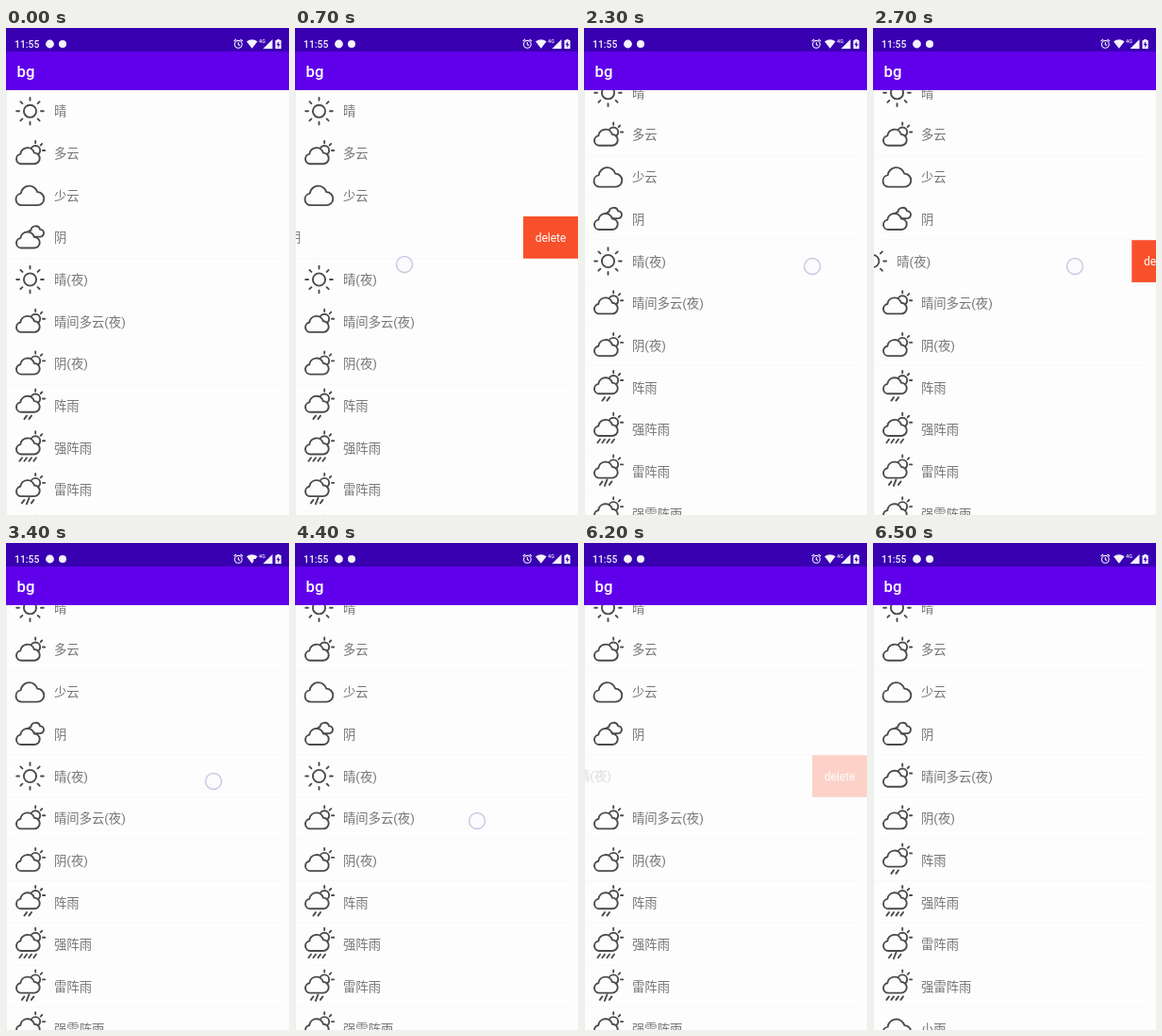
Write an HTML page that moves like this. It is 300 px wide and 517 px high and loops after 7.7 s.

```html
<!DOCTYPE html>
<html lang="zh-CN">
<head>
<meta charset="utf-8">
<title>bg</title>
<style>
  html, body { margin: 0; width: 100%; height: 100%; overflow: hidden; background: #fdfdfd; }
  svg { display: block; width: 100%; height: 100%; }
  text { font-family: Roboto, "Noto Sans CJK SC", "Noto Sans CJK", sans-serif; }
  .label { font-size: 13.33px; fill: #757575; }
  .icon { fill: none; stroke: #4b4b4b; stroke-width: 1.9; stroke-linecap: round; stroke-linejoin: round; }
  .icon * { vector-effect: non-scaling-stroke; }
  .solid { fill: #fdfdfd; }
</style>
</head>
<body>
<svg id="stage" viewBox="0 0 300 517">
  <rect width="300" height="517" fill="#fdfdfd"/>
  <g id="list"></g>
  <rect y="66" width="1" height="451" fill="#ebeeee"/>
  <rect y="25" width="300" height="41" fill="#6000ea"/>
  <rect width="300" height="25" fill="#3800b1"/>
  <text x="11.5" y="51.5" font-size="16.67" font-weight="500" fill="#fff">bg</text>
  <g fill="#f4f2fb">
    <text x="9" y="20.8" font-size="10.4" font-weight="500">11:55</text>
    <circle cx="46.5" cy="17" r="4.4"/>
    <circle cx="60" cy="17" r="4"/>
    <g fill="none" stroke="#f4f2fb" stroke-width="1.1">
      <circle cx="246.3" cy="17.3" r="3.9"/>
      <path d="M246.3 15v2.6l1.8 1M241.6 14l2.4-2M251 14l-2.4-2"/>
    </g>
    <path d="M255 14.3Q260.8 10 266.600 14.3L260.8 21.800Z"/>
    <path id="notch" d="M262.500 21.500v-4.500h4.500v4.500z" fill="#3800b1"/>
    <text x="268" y="15.600" font-size="5.500" font-weight="500">4G</text>
    <path d="M282.500 12v10h-10z"/>
    <path d="M285.500 13h1.700v-1h2.800v1h1.700v9h-6.200z"/>
    <path d="M289.200 14l-2.400 4h1.500v3l2.300-4h-1.400z" fill="#3800b1"/>
  </g>
  <circle id="touch" r="8.500" fill="#fafaff" fill-opacity=".6" stroke="#cbc9e4" stroke-width="1.500"/>
</svg>
<script>
const LOOP = 7700, STEP = 100;
const ROW = 44.68, TOP = 66, MENU = 58;
const SWIPED = 3, DELETED = 4;
const $ = id => document.getElementById(id);

// Icons, drawn around their own centre
const cloudPath = 'M-8.5 10.5a6.3 6.3 0 0 1-1-12.5a9 9 0 0 1 17.6-1.5a7 7 0 0 1 0 14z';
const cloud = (x = 0, y = 0, s = 1) =>
  `<path class="solid" transform="translate(${x} ${y}) scale(${s})" d="${cloudPath}"/>`;

function sunAt(x, y, r, inner, outer, from, to) {
  let rays = '';
  for (let a = from; a <= to; a += 45) {
    const c = Math.cos(a * Math.PI / 180), s = Math.sin(a * Math.PI / 180);
    rays += `M${x + c * inner} ${y + s * inner}L${x + c * outer} ${y + s * outer}`;
  }
  return `<circle cx="${x}" cy="${y}" r="${r}"/><path d="${rays}"/>`;
}

const sun = () => sunAt(0.3, 0, 6.6, 11.5, 14.3, 0, 315);
const partly = () => sunAt(6, -3, 5, 7.8, 10, -90, 0) + cloud(-2, 2.5, 0.83);
const overcast = () => cloud(6.5, -6.5, 0.55) + cloud(-2, 2.5, 0.83);

function shower(drops, long = -1) {
  let d = '';
  for (let i = 0; i < drops; i++) {
    const x = -2 + (i - (drops - 1) / 2) * 5, extra = i === long ? 2 : 0;
    d += `M${x + 1.3} ${10.5 - extra}L${x - 1.3} ${14 + extra / 2}`;
  }
  return `<g transform="translate(0 -4.5)">${partly()}</g><path d="${d}"/>`;
}

const items = [
  ['晴', sun()], ['多云', partly()], ['少云', cloud()], ['阴', overcast()],
  ['晴(夜)', sun()], ['晴间多云(夜)', partly()], ['阴(夜)', partly()],
  ['阵雨', shower(2)], ['强阵雨', shower(4)], ['雷阵雨', shower(3, 1)],
  ['强雷阵雨', shower(4)], ['小雨', cloud()]
];

$('list').innerHTML = items.map(([name, icon]) => `<g>
  <rect y="${ROW - 1}" width="294" height="1" fill="#f8f9f9"/>
  <g>
    <g class="icon" transform="translate(25.2 22.3)">${icon}</g>
    <text class="label" x="51" y="27.3">${name}</text>
    <rect x="300" width="${MENU}" height="${ROW}" fill="#f8502b"/>
    <text x="${300 + MENU / 2}" y="26.5" font-size="12" fill="#fff" text-anchor="middle">delete</text>
  </g>
</g>`).join('');
const rows = [...$('list').children];

// Linear interpolation through [time, value, ...] keys
function track(keys, t) {
  if (t <= keys[0][0]) return keys[0].slice(1);
  for (let i = 1; i < keys.length; i++) {
    const a = keys[i - 1], b = keys[i];
    if (t < b[0]) {
      const k = (t - a[0]) / (b[0] - a[0]);
      return a.slice(1).map((v, j) => v + (b[j + 1] - v) * k);
    }
  }
  return keys[keys.length - 1].slice(1);
}

const scrollKeys = [[1600, 0], [1900, 19.5]];
const collapseKeys = [[6200, 0], [6500, ROW]];
const fadeKeys = [[6050, 1], [6250, 0]];
const swipeKeys = [[150, 0], [400, 38], [600, MENU], [1200, MENU], [1400, 0]];
const deleteKeys = [
  [2350, 0], [2650, 30], [3000, 0],
  [3400, 0], [3600, 28], [3800, MENU], [4399, MENU], [4400, 0],
  [5050, 0], [5300, 46], [5450, MENU]
];
// Each touch: end time, then its path as [time, x, y]
const touches = [
  [800, [[100, 180, 236], [600, 116, 251]]],
  [2100, [[1500, 165, 322], [1600, 166.5, 319], [1900, 179, 293.5]]],
  [3900, [[2300, 242, 253], [2650, 213, 253], [3000, 220, 253], [3400, 220, 253], [3800, 180, 253]]],
  [5000, [[4400, 193, 295]]],
  [5500, [[5000, 225, 255], [5300, 182.5, 255], [5400, 172, 255]]],
  [6200, [[6000, 277, 248]]]
];

function draw(t) {
  const [scroll] = track(scrollKeys, t), [gap] = track(collapseKeys, t);
  rows.forEach((row, i) => {
    const y = TOP + i * ROW - scroll - (i > DELETED ? gap : 0);
    row.setAttribute('transform', `translate(0 ${y})`);
  });
  const slide = (i, keys) =>
    rows[i].lastElementChild.setAttribute('transform', `translate(${-track(keys, t)[0]} 0)`);
  slide(SWIPED, swipeKeys);
  slide(DELETED, deleteKeys);
  rows[DELETED].setAttribute('opacity', track(fadeKeys, t)[0]);

  const active = touches.find(([end, path]) => t >= path[0][0] && t < end);
  $('touch').setAttribute('visibility', active ? 'visible' : 'hidden');
  if (active) {
    const [x, y] = track(active[1], t);
    $('touch').setAttribute('transform', `translate(${x} ${y})`);
  }
  $('notch').setAttribute('visibility', t >= 3400 && t < 4400 ? 'visible' : 'hidden');
}

const start = performance.now();
function tick() {
  const t = (performance.now() - start) % LOOP;
  draw(Math.floor(t / STEP) * STEP);
  requestAnimationFrame(tick);
}
tick();
</script>
</body>
</html>
```
